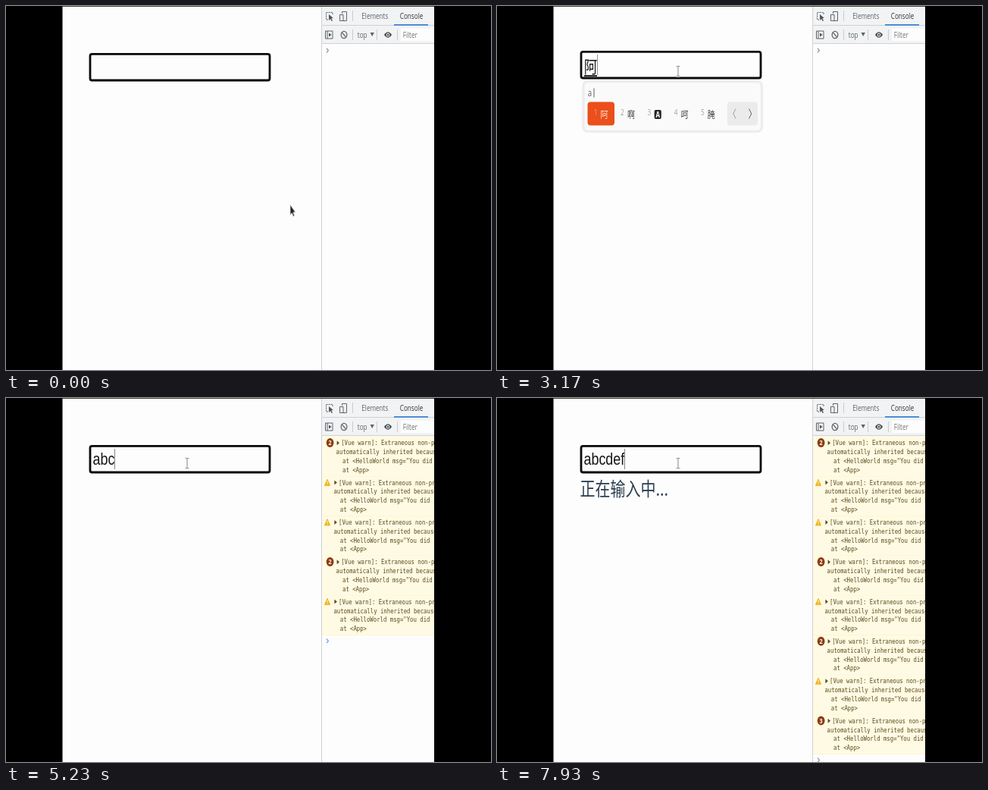
Animation of 640x480 px, one loop 8000 ms. Source, as an HTML page:

```html
<!DOCTYPE html>
<html lang="en">
<head>
<meta charset="utf-8">
<title>Typing indicator demo</title>
<style>
html, body { margin: 0; width: 100%; height: 100%; overflow: hidden; background: #000; }
svg { display: block; width: 100vw; height: 100vh; }
text { white-space: pre; }
.ui { font: 10.2px "Open Sans", "Noto Sans", sans-serif; fill: #5f6368; }
.mono { font: 9.14px "DejaVu Sans Mono", monospace; fill: #5c4a1c; }
.field { font: 22.4px "Liberation Sans", Arial, sans-serif; fill: #161616; }
.cjk { font-family: "Noto Sans CJK SC", "Noto Sans CJK", sans-serif; }
.line { fill: none; stroke: #5f6368; stroke-width: 1; }
</style>
</head>
<body>
<svg id="stage" viewBox="0 0 640 480" preserveAspectRatio="none">
  <defs><clipPath id="screen"><rect x="74" width="491" height="480"/></clipPath></defs>
  <rect width="640" height="480"/>
  <g clip-path="url(#screen)">
    <rect x="74" width="491" height="480" fill="#fdfdfd"/>
    <g id="page"></g>
    <g id="tools"></g>
    <g id="log"></g>
    <path d="M74.5 0V480" fill="none" stroke="#77776c"/>
    <path d="M74 .5H565" fill="none" stroke="#44443a"/>
    <g id="mouse"></g>
  </g>
</svg>
<script>
const LOOP = 8000;
const SQUEEZE = 0.8;
const $ = id => document.getElementById(id);

function add(parent, tag, attrs = {}, text) {
  const el = document.createElementNS("http://www.w3.org/2000/svg", tag);
  for (const k in attrs) el.setAttribute(k, attrs[k]);
  if (text !== undefined) el.textContent = text;
  parent.append(el);
  return el;
}
const label = (parent, x, y, text, cls, style = "") =>
  add(parent, "text", { transform: `translate(${x} ${y}) scale(${SQUEEZE} 1)`, class: cls, style }, text);
const path = (parent, d, attrs) => add(parent, "path", { d, ...attrs });
const rect = (parent, x, y, width, height, fill, rx = 0) =>
  add(parent, "rect", { x, y, width, height, fill, rx });
const show = (el, v) => el.setAttribute("opacity", +v);

// Input field
const page = $("page");
const field = add(page, "g");
add(field, "rect", { x: 111, y: 63.4, width: 237, height: 34.6, rx: 2.5, fill: "#fdfdfd", stroke: "#0a0a0a", "stroke-width": 2.8 });
const value = label(field, 114.5, 88, "", "field");
const preedit = add(field, "g");
label(preedit, 114.8, 90.5, "阿", "cjk", "font-size:22px;fill:#161616");
rect(preedit, 115, 94.2, 17, 1.8, "#161616");
const caret = rect(field, 0, 67, 1, 27, "#858585");
const typing = label(page, 109.5, 128.5, "正在输入中...", "cjk", "font-size:25px;fill:#2c3e50");

// Candidate window
const popup = add(page, "g");
add(popup, "rect", { x: 114, y: 99.5, width: 235.5, height: 66, rx: 6, fill: "#fafafa", stroke: "#ededed", "stroke-width": 3.4 });
label(popup, 119.8, 118.5, "a", "ui", "font-size:12px");
rect(popup, 127.5, 108.5, 1, 12, "#5f5f5f");
rect(popup, 119.5, 126.5, 35.5, 31, "#ea4f1c", 4);
["阿", "啊", "A", "呵", "腌"].forEach((ch, i) => {
  const x = 127.8 + 35.3 * i;
  label(popup, x, 144, i + 1, "ui", `fill:${i ? "#a0a0a0" : "#f89a78"}`);
  if (ch === "A") {
    rect(popup, x + 9.2, 137, 9.2, 12, "#262626", 2);
    label(popup, x + 11, 147, ch, "ui", "font-weight:700;font-size:10px;fill:#fff");
  } else {
    label(popup, x + 8.8, 147.6, ch, "cjk", `font-size:12.5px;fill:${i ? "#454545" : "#ffe8dc"}`);
  }
});
rect(popup, 304, 126.5, 40, 31, "#ebebeb", 4);
path(popup, "M315 135.5l-3.2 6.5 3.2 6.5", { class: "line", style: "opacity:.55" });
path(popup, "M332.5 135.5l3.2 6.5-3.2 6.5", { class: "line" });

// Console toolbar
const tools = $("tools");
rect(tools, 416, 0, 149, 49.5, "#f1f3f4");
path(tools, "M416.5 0V480M416 25.5H565M416 49.5H565", { fill: "none", stroke: "#d0d2d6" });
path(tools, "M457.5 6V20M457.5 31V45M489.5 31V45M516.5 31V45", { fill: "none", stroke: "#cccccc" });
rect(tools, 512, 24, 45, 1.8, "#3f86d8");
label(tools, 469.3, 17, "Elements", "ui");
label(tools, 519.8, 17, "Console", "ui", "fill:#333");
label(tools, 463.8, 41.5, "top", "ui");
path(tools, "M480.5 35h5.4l-2.7 5z", { fill: "#5f6368" });
rect(tools, 521, 29.5, 44, 16.5, "#fdfdfd");
label(tools, 523.8, 41.5, "Filter", "ui", "fill:#757575");
path(tools, "M431 11V8.5H422.5V18H425", { class: "line", "stroke-dasharray": "2 1" });
path(tools, "M426 11l5.8 5-2.6.3 1.8 3-1.3.8-1.7-3-1.8 2z", { fill: "#4c4f54" });
path(tools, "M443.5 10V7.5H449.5V19.5H445M440.5 11.5H445V19.5H440.5Z", { class: "line" });
path(tools, "M421.5 33H431V43H421.5ZM424 33V43", { class: "line" });
path(tools, "M426 35.5l3.6 2.5-3.6 2.5z", { fill: "#4c4f54" });
add(tools, "ellipse", { cx: 446, cy: 38, rx: 3.8, ry: 4.6, class: "line", style: "stroke-width:1.3" });
path(tools, "M443.4 34.8l5.2 6.4", { class: "line", style: "stroke-width:1.3" });
path(tools, "M499 38Q504 30.5 509 38Q504 45.5 499 38Z", { fill: "#4c4f54" });
add(tools, "ellipse", { cx: 504, cy: 38, rx: 2.2, ry: 2.6, fill: "#f1f3f4" });
add(tools, "ellipse", { cx: 504, cy: 38, rx: 1.2, ry: 1.5, fill: "#4c4f54" });

// Console warnings: [time, repeat count]
const PITCH = 52.35;
const warnings = [
  [3230, 2], [4170, 1], [4400, 1], [5000, 2], [5200, 1], [6000, 2], [6110, 1], [7600, 3]
];
const lines = ["[Vue warn]: Extraneous non-props attributes", "automatically inherited because component",
  "at <HelloWorld msg=\"You did it!\"", "at <App>"];
const log = $("log");
const rows = warnings.map(([, count], i) => {
  const g = add(log, "g", { transform: `translate(0 ${59.2 + PITCH * i})` });
  const left = count > 1 ? 435.6 : 432.4;
  const top = i ? -7.95 : -9.2;
  rect(g, 417, top, 148, 44.4 - top, "#fffae3");
  rect(g, 417, 43.7, 148, .7, "#fff3c4");
  if (count > 1) {
    add(g, "ellipse", { cx: 427.6, cy: -.2, rx: 4.9, ry: 6, fill: "#8c3c0c" });
    g.badge = label(g, 425.5, 3.2, count, "ui", "font-weight:700;font-size:9px;fill:#fff");
  } else {
    path(g, "M424 -4.2L427.5 4H420.5Z", { fill: "#f0b41c", stroke: "#f0b41c", "stroke-linejoin": "round" });
    rect(g, 423.6, -2, .9, 3.2, "#fff");
    rect(g, 423.6, 2.1, .9, 1.1, "#fff");
  }
  path(g, `M${left + 1} -3l3.4 3-3.4 3z`, { fill: "#5c4a1c" });
  lines.forEach((s, n) => label(g, left + [6.6, 0, 8.4, 8.4][n], 3.1 + 11.8 * n, s, "mono"));
  return g;
});
const prompt = path(log, "M423 -2.8l2.4 2.8-2.4 2.8", { fill: "none", "stroke-width": 1.1 });

// Mouse pointer
const mouse = $("mouse");
const arrow = add(mouse, "g");
path(arrow, "M0 0V13.5L2.3 11 4 15.5 5.7 14.5 4 10H7Z",
  { fill: "#262626", stroke: "#e4e4e4", "stroke-width": .8 });
const beam = add(mouse, "g");
const beamShape = "M-2.5 -6.5H2.5M0 -6.5V6.5M-2.5 6.5H2.5";
path(beam, beamShape, { fill: "none", stroke: "#f4f4f0", "stroke-width": 2.6 });
path(beam, beamShape, { fill: "none", stroke: "#9a9a94", "stroke-width": 1.1 });

// [time, text, caret x]
const texts = [[0, "", 114.6], [1900, "", 132], [3230, "a", 124.3], [4170, "ab", 134], [4970, "abc", 143],
  [5970, "abcd", 153], [7570, "abcde", 163], [7800, "abcdef", 168]];
// [time, caret opacity, fade time]
const blinks = [[0, 0, 0], [130, 1, 0], [650, 0, 100], [1270, 1, 100], [1900, 1, 0], [2520, 0, 60], [3100, 1, 80],
  [3230, 1, 0], [3800, 0, 100], [4170, 1, 0], [4780, 0, 40], [4970, 1, 0], [5700, 0, 100], [5970, 1, 0],
  [6520, 0, 80], [7170, 1, 100]];
const typingTimes = [[4230, 4400], [5000, 5200], [6000, 6110], [7600, LOOP]];

const clamp = v => Math.max(0, Math.min(1, v));
const ramp = (t, from, to) => clamp((t - from) / (to - from));
const ease = p => p * p * (3 - 2 * p);
const lastIndex = (list, t) => list.filter(e => e[0] <= t).length - 1;

function caretOpacity(t) {
  const i = lastIndex(blinks, t);
  const [start, to, fade] = blinks[i];
  const from = i ? blinks[i - 1][1] : 0;
  return fade ? from + (to - from) * ramp(t, start, start + fade) : to;
}

function draw(t) {
  const [, text, caretX] = texts[lastIndex(texts, t)];
  const composing = t >= 1900 && t < 3230;
  value.textContent = text;
  show(preedit, composing);
  field.setAttribute("transform", `translate(0 ${composing ? -3 : 0})`);
  caret.setAttribute("x", caretX);
  show(caret, caretOpacity(t));
  show(popup, ramp(t, 1890, 1990) * (1 - ramp(t, 3220, 3300)));
  show(typing, typingTimes.some(([a, b]) => t >= a && t < b));

  const count = lastIndex(warnings, t) + 1;
  rows.forEach((g, i) => show(g, i < count));
  rows[7].badge.textContent = t < 7800 ? 2 : 3;
  prompt.setAttribute("transform", `translate(0 ${58.7 + PITCH * count})`);
  prompt.setAttribute("stroke", t >= 4400 && t < 7600 ? "#5a94e0" : "#858585");

  const p = ease(ramp(t, 300, 870));
  const x = 375 - 136 * p, y = 262 - 176 * p;
  const inside = y < 99;
  arrow.setAttribute("transform", `translate(${x} ${y})`);
  beam.setAttribute("transform", `translate(${x} ${y})`);
  show(arrow, !inside);
  show(beam, inside);
}

const began = performance.now();
function tick() {
  draw((performance.now() - began) % LOOP);
  requestAnimationFrame(tick);
}
tick();
</script>
</body>
</html>
```
